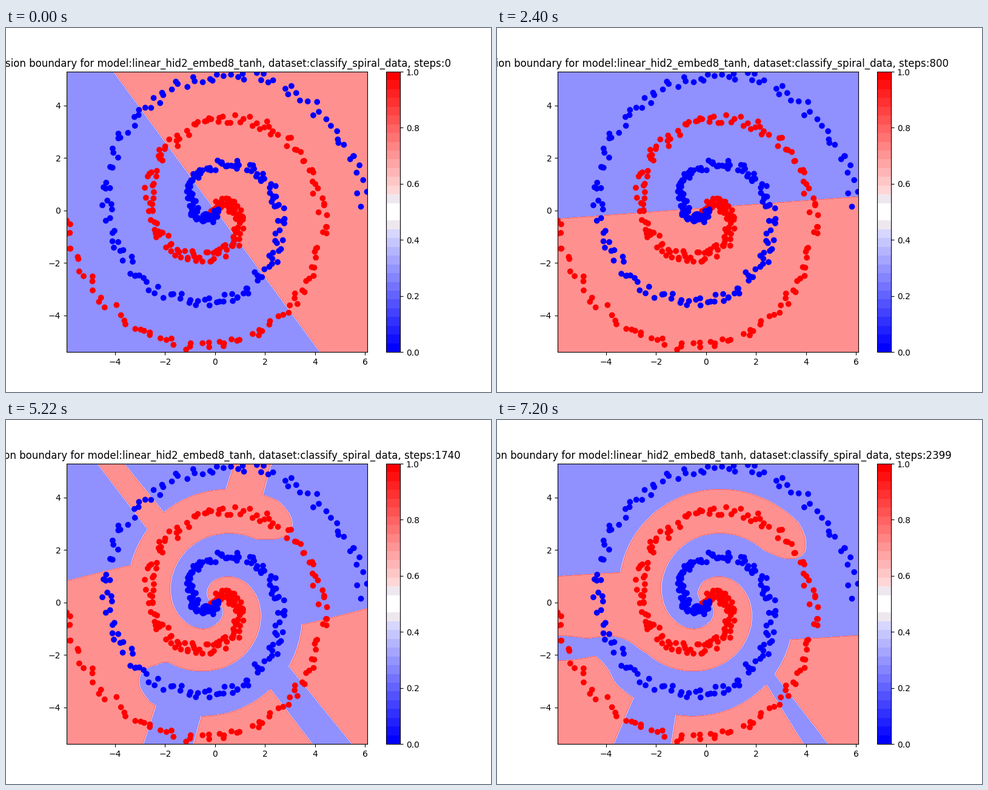
A matplotlib script that plays this animation: 800x600 px, repeating every 7260 ms.

```python
import numpy as np
import matplotlib.pyplot as plt
from matplotlib.animation import FuncAnimation
from matplotlib.colors import ListedColormap

FRAMES, INTERVAL = 121, 60
LEFT, TOP, WIDTH, HEIGHT = 100, 72, 496, 462
XLIM, YLIM = (-5.94, 6.09), (-5.39, 5.285)
MID_X, MID_Y = 346, 301
TURNS = 3.5 * np.pi     # angle swept by one arm
REACH = 6               # radius at the end of an arm
KEYS = [26, 56, 66, 77, 87, 102, 120]

plt.rcParams["font.family"] = "DejaVu Sans"

# Pixel centres on the stage, and the same places in data units
X, Y = np.meshgrid(LEFT + 0.5 + np.arange(WIDTH), TOP + 0.5 + np.arange(HEIGHT))
ux = XLIM[0] + (X - LEFT) / WIDTH * (XLIM[1] - XLIM[0])
uy = YLIM[1] - (Y - TOP) / HEIGHT * (YLIM[1] - YLIM[0])

# Ideal spiral: red where positive; arm is the angle travelled along the nearest arm
angle = np.arctan2(ux, uy) % (2 * np.pi)
wind = TURNS / REACH * np.hypot(ux, uy)
SPIRAL = 23 * np.cos(angle - wind)
ARM = angle + np.pi * np.round((wind - angle) / np.pi)


def at(n, *values):
    return np.interp(n, KEYS, values)


def turning_line(n):
    """Straight boundary that swings round and settles almost level."""
    a = np.radians(-89 + 125.3 * np.exp(-n / 6.1))
    pivot = MID_Y + 8 * n / KEYS[0]
    return (X - MID_X) * np.cos(a) - (Y - pivot) * np.sin(a)


def folded_line(n):
    """Tilted boundary with a step in the middle."""
    pivot = at(n, 309, 281, 337, 366, 288, 294, 306)
    fold = at(n, 0, 0, 0, 23, 87, 80, 66)
    slope = at(n, 0.048, -0.008, 0.15, 0.35, 0.26, 0.25, 0.07)
    if n < KEYS[1]:
        slope += 0.25 * np.sin(2 * np.pi * (n - KEYS[0]) / (KEYS[1] - KEYS[0]))
    dx = X - MID_X
    line = pivot + fold * np.tanh(dx / 60) - slope * dx
    return (Y - line) / np.hypot(1, slope)


def stripe(x_top, x_bottom, half_top, half_bottom):
    """Positive inside a slanted stripe across the plot."""
    v = (Y - TOP) / HEIGHT
    run = x_bottom - x_top
    across = np.abs(X - x_top - run * v) * HEIGHT / np.hypot(HEIGHT, run)
    return half_top + (half_bottom - half_top) * v - across


def flip(phi, inside):
    return np.maximum(np.minimum(phi, -inside), np.minimum(-phi, inside))


def field(n):
    """Positive where the model says red."""
    if n < KEYS[0]:
        return turning_line(n)
    phi = folded_line(n)
    if n <= KEYS[2]:
        return phi
    phi = flip(phi, stripe(at(n, 173, 173, 173, 173, 173, 203, 203),
                           at(n, 537, 537, 537, 537, 537, 520, 525),
                           at(n, -60, -60, -60, -10, 17, 17, -10),
                           at(n, -60, -60, -60, -10, 26, 21, 17)))
    phi = flip(phi, stripe(at(n, 406, 406, 406, 406, 406, 375, 375),
                           at(n, 268, 268, 268, 268, 268, 271, 240),
                           at(n, -60, -60, -60, -10, 29, 26, -15),
                           at(n, -60, -60, -60, -10, 40, 51, 46)))
    pocket = at(n, 0, 0, 0, 0, 0, 1, 0.85)
    phi = np.minimum(phi, 20 * (np.hypot((X - 90) / 105, (Y - 376) / 24) - pocket))
    # The spiral is learned from the centre outwards along its arms
    learned = at(n, -2, -2, -2, 2.2, 7.1, 7.28, 7.4)
    w = np.clip((learned - ARM) / 0.5 + 0.5, 0, 1)
    return w * SPIRAL + (1 - w) * np.clip(phi, -20, 20)


def paint(n):
    red = field(n) > 0
    pad = np.pad(red, 1, mode="edge")
    up, down = pad[:-2, 1:-1], pad[2:, 1:-1]
    left, right = pad[1:-1, :-2], pad[1:-1, 2:]
    img = np.empty((HEIGHT, WIDTH, 3), np.uint8)
    img[:] = (144, 144, 255)
    img[red] = (255, 144, 144)
    img[red & ~(up & down & left & right)] = (255, 100, 100)
    img[~red & (left | right)] = (235, 210, 238)
    return img


def spiral(rng, phase, count=250, noise=0.2):
    u = np.arange(count) / count
    t = TURNS * u + phase
    x = REACH * u * np.sin(t) + rng.uniform(-noise, noise, count)
    y = REACH * u * np.cos(t) + rng.uniform(-noise, noise, count)
    return np.clip(x, *XLIM), np.clip(y, *YLIM)


def blue_white_red():
    fade = np.arange(16) / 15 * 247 / 255
    blue = np.column_stack([fade, fade, np.ones(16)])
    blue[14] = np.array([238, 232, 238]) / 255
    blue[15] = 1
    return ListedColormap(np.vstack([blue, blue[::-1, ::-1]]))


fig, ax = plt.subplots(figsize=(8, 6), dpi=100)
fig.subplots_adjust(left=0.125, right=0.9, bottom=0.11, top=0.88)
region = ax.imshow(paint(0), extent=(*XLIM, *YLIM), aspect="auto",
                   interpolation="nearest", zorder=0)

rng = np.random.default_rng(7)
red, blue = spiral(rng, 0), spiral(rng, np.pi)
dots = ax.scatter(np.r_[red[0], blue[0]], np.r_[red[1], blue[1]],
                  c=np.repeat([1, 0], 250), cmap=blue_white_red(),
                  vmin=0, vmax=1)
fig.colorbar(dots, ax=ax)
ax.set(xlim=XLIM, ylim=YLIM, xticks=range(-4, 7, 2), yticks=range(-4, 5, 2))
title = ax.set_title("")


def draw(n):
    region.set_data(paint(n))
    title.set_text("Decision boundary for model:linear_hid2_embed8_tanh, "
                   f"dataset:classify_spiral_data, steps:{min(20 * n, 2399)}")
    return region, title


anim = FuncAnimation(fig, draw, frames=FRAMES, interval=INTERVAL,
                     init_func=lambda: (region, title), repeat=True)
plt.show()
```
